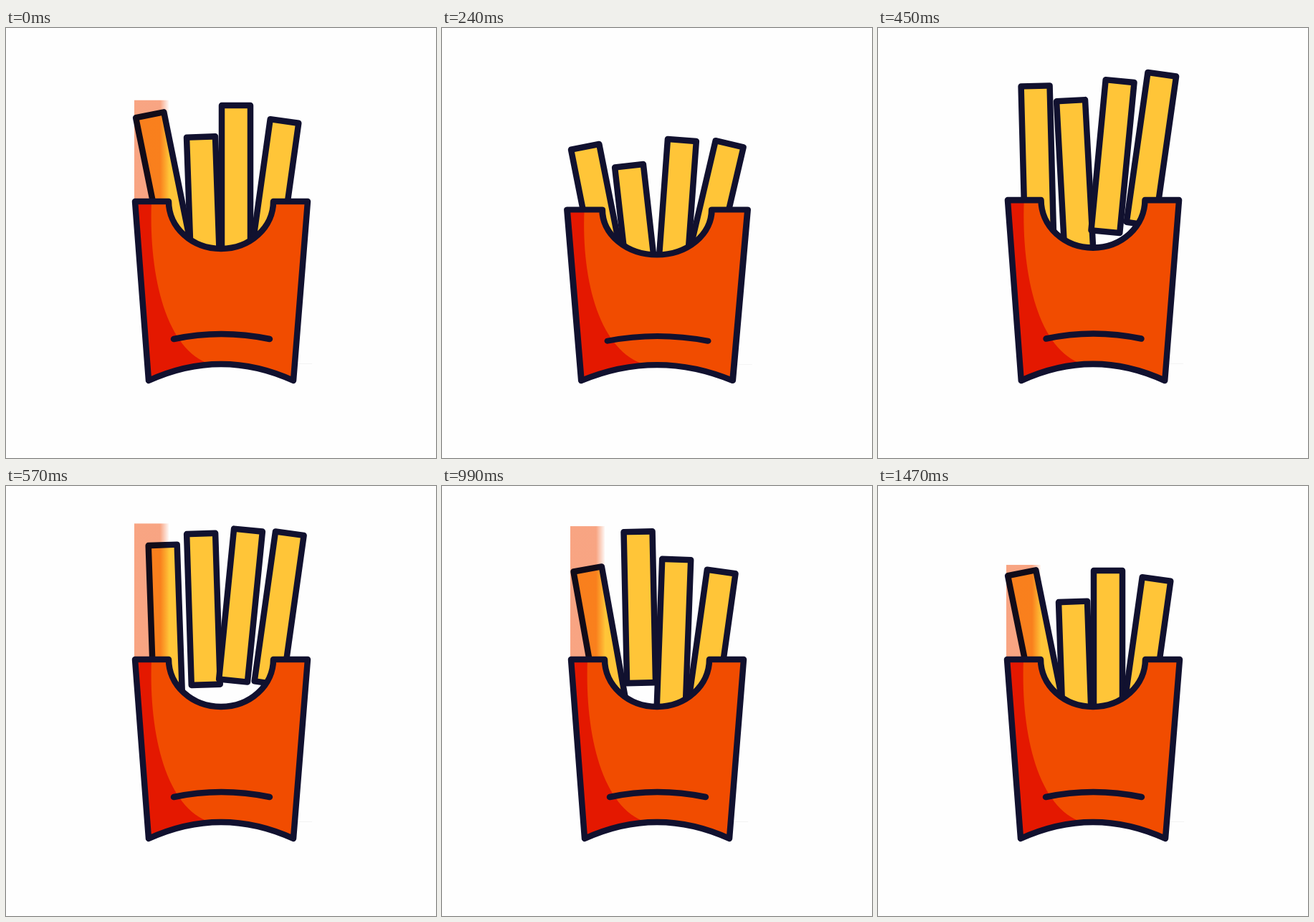
These frames come from a looping animation (600 px wide and 600 px high, 3.86 s). An HTML page with a canvas:

```html
<!DOCTYPE html>
<html lang="en">
<head>
<meta charset="utf-8">
<title>Fries</title>
<style>
html, body { margin: 0; width: 100%; height: 100%; overflow: hidden; background: #fefefe; }
canvas { display: block; }
</style>
</head>
<body>
<canvas id="stage" width="600" height="600"></canvas>
<script>
const ctx = document.getElementById('stage').getContext('2d');
const LOOP = 3860, STEP = 30, DIP = 150, END = 1470;
const PAPER = '#fefefe', INK = '#11112f', YELLOW = '#ffc538', ORANGE = '#f14c00', RED = '#e41800';
const WIDTH = 40, LENGTH = 211, LINE = 8.5;

const BOX = new Path2D('M180 242H227A73 66 0 0 0 373 242H421L401 492Q300 446 199 492Z');
const SHADE = new Path2D('M180 242H203C199 350 225 450 285 469Q238 472 199 492Z');
const CREASE = new Path2D('M234 434Q300 420 368 434');

const smooth = u => u * u * (3 - 2 * u);
const sineOut = u => Math.sin(u * Math.PI / 2);
const rad = deg => deg * Math.PI / 180;

// Value at time t along keys of [time, values, easing into the key]
function follow(t, keys) {
  const i = keys.findIndex(k => k[0] > t);
  if (i < 0) return keys[keys.length - 1][1];
  const [t0, from] = keys[i - 1], [t1, to, ease = smooth] = keys[i];
  const s = ease((t - t0) / (t1 - t0));
  return from.map((v, n) => v + (to[n] - v) * s);
}

// A pose is x and y of the top middle and a tilt in degrees.
// The fry dips, flies up, hangs, falls a bit too deep and settles.
function fry(rest, dip, peak, rise, drop, land, sag = 0, settled = 0) {
  const sunk = depth => [rest[0], rest[1] + depth, rest[2]];
  return [[0, rest], [DIP, dip], [rise, peak, sineOut], [drop, peak],
    [land, sunk(sag)], [END, sunk(settled)]];
}

const FRIES = [
  fry([200.7, 121.3, -11.5], [184.8, 229, -18.5], [219.8, 80, -1.4], 473, 473, 1140),
  fry([272, 152, -2], [257, 237.4, -8.1], [273.8, 47.3, -1.1], 740, 900, 1290, 17, 9.4),
  fry([321, 108, 0], [333.3, 205, 3.4], [338, 61.6, 5.7], 560, 730, 1170, 18, 10),
  fry([388.5, 130, 8], [404.7, 232, 16.9], [396.2, 63, 8], 480, 480, 1160)
];
const SQUASH = [[0, [0]], [120, [0.104]], [360, [-0.0125]], [570, [0]]];

function drawFry([x, y, tilt]) {
  ctx.save();
  ctx.translate(x, y);
  ctx.rotate(rad(tilt));
  ctx.beginPath();
  ctx.rect(-WIDTH / 2, 0, WIDTH, LENGTH);
  ctx.fillStyle = YELLOW;
  ctx.fill();
  ctx.stroke();
  ctx.restore();
}

// Reddish band that reaches up to the highest fry
function drawTint(poses) {
  const tops = poses.map(([, y, tilt]) => y - WIDTH / 2 * Math.abs(Math.sin(rad(tilt))));
  const top = Math.min(...tops) - LINE / 2 - 3;
  const fade = ctx.createLinearGradient(215, 0, 228, 0);
  fade.addColorStop(0, '#f9a583');
  fade.addColorStop(1, '#fff');
  ctx.globalCompositeOperation = 'multiply';
  ctx.fillStyle = fade;
  ctx.fillRect(179, top, 48, 242 - top);
  ctx.globalCompositeOperation = 'source-over';
}

function drawBox(squash) {
  ctx.save();
  ctx.translate(300, 492);
  ctx.scale(1 + squash, 1 - squash);
  ctx.translate(-300, -492);
  ctx.fillStyle = '#f3f3f3';
  ctx.fillRect(300, 468, 127, 1);
  ctx.fillStyle = ORANGE;
  ctx.fill(BOX);
  ctx.fillStyle = RED;
  ctx.fill(SHADE);
  ctx.stroke(BOX);
  ctx.stroke(CREASE);
  ctx.restore();
}

function draw(t) {
  ctx.fillStyle = PAPER;
  ctx.fillRect(0, 0, 600, 600);
  ctx.strokeStyle = INK;
  ctx.lineWidth = LINE;
  ctx.lineJoin = ctx.lineCap = 'round';
  const poses = FRIES.map(keys => follow(t, keys));
  const [squash] = follow(t, SQUASH);
  poses.forEach(drawFry);
  if (squash === 0) drawTint(poses);
  drawBox(squash);
}

const start = performance.now();
function tick() {
  const t = (performance.now() - start) % LOOP;
  draw(Math.floor(t / STEP) * STEP);
  requestAnimationFrame(tick);
}
tick();
</script>
</body>
</html>
```
